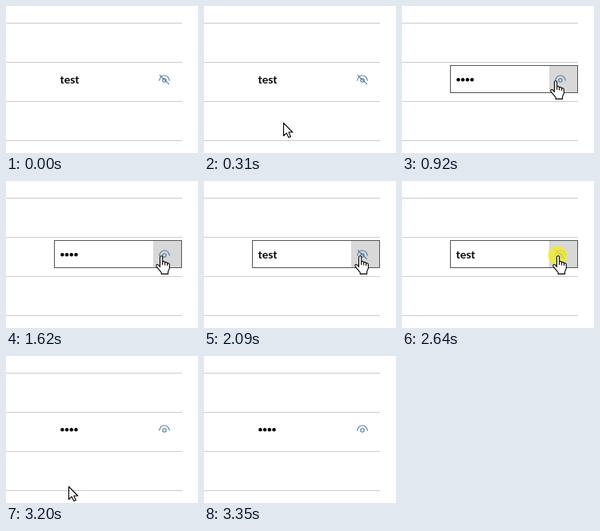
Animation, 240 px wide and 184 px high, one loop 4.52 s. Source, as an HTML page:

```html
<!DOCTYPE html>
<html lang="en">
<head>
<meta charset="utf-8">
<title>Password field</title>
<style>
html, body { margin: 0; width: 100%; height: 100%; overflow: hidden; background: #fff; }
svg { display: block; width: 240px; height: 184px; }
text { font: 700 14px Lato, sans-serif; }
.eye { fill: none; stroke: #4c7799; stroke-width: 1.1; stroke-linecap: round; }
.cursor { fill: #fff; stroke: #000; stroke-width: 1.1; stroke-linejoin: round; }
</style>
</head>
<body>
<svg viewBox="0 0 240 184">
  <path d="M0 21.5H220M0 70.5H220M0 119.5H220M0 168.5H220" stroke="#cbcbcb"/>
  <g id="field">
    <rect x="60" y="74" width="160" height="35" fill="#fff"/>
    <rect x="184" y="75" width="35" height="33" fill="#d8d8d8"/>
    <rect x="60.5" y="74.5" width="159" height="34" fill="none" stroke="#555"/>
  </g>
  <text id="word" x="67.5" y="97">test</text>
  <g id="dots">
    <circle cx="70.4" cy="92.3" r="2.2"/><circle cx="76.1" cy="92.3" r="2.2"/>
    <circle cx="81.8" cy="92.3" r="2.2"/><circle cx="87.5" cy="92.3" r="2.2"/>
  </g>
  <g class="eye">
    <path d="M191.6 93.2C193.5 84.9 202.5 84.9 204.4 93.2"/>
    <circle cx="198" cy="93" r="2.2"/>
    <path id="slash" d="M192.3 86.7L203.5 97.7"/>
  </g>
  <circle id="click" cx="194.5" cy="93" r="12" fill="#f4ee20" opacity=".75"/>
  <path id="arrow" class="cursor" d="M.5 .5V16.5L4.2 13L6.8 18.6L9.4 17.5L6.9 12H11.8Z"/>
  <g id="hand" class="cursor">
    <path d="M5.5 14.5V2.3C5.5 .2 8.7 .2 8.7 2.3V8.2C9.2 7.2 11.6 7.4 11.7 9C12.4 8.2 14.4 8.4 14.6 10C15.6 9.4 17.4 10 17.4 11.8V15.5C17.4 18 15.6 19 15.6 21V23.4H7.2V21.5C6 19.5 2.5 16.5 1 13.8C.2 12 2.2 10.8 3.6 12.2L5.5 14.5Z"/>
    <path d="M8.7 8.2V12M11.7 9V12.4M14.6 10V13" fill="none"/>
  </g>
</svg>
<script>
const LOOP = 4520;
const $ = id => document.getElementById(id);
const show = (id, on) => $(id).setAttribute('visibility', on ? 'visible' : 'hidden');
const within = (t, a, b) => t >= a && t < b;

// Point on a quadratic curve
const curve = (p, a, b, c) => [0, 1].map(i =>
  (1 - p) ** 2 * a[i] + 2 * p * (1 - p) * b[i] + p * p * c[i]);

// The pointer is sampled in steps of about 78 ms
const stepAt = (t, start) => Math.floor((t - start + 2) / 78);

function pointer(t) {
  if (t < 150 || t >= 3350) return null;
  if (t < 540) return curve(Math.min(stepAt(t, 150), 4) / 5, [2, 163], [140, 150], [192, 93]);
  if (t < 1620) return [192, 93];
  if (t < 1700) return [194, 93];
  if (t < 2960) return [195, 93];
  return curve(Math.min(stepAt(t, 2960), 4) / 4, [195, 120], [170, 165], [3, 166]);
}

function draw(t) {
  const pos = pointer(t);
  const hover = pos && within(pos[0], 60, 220) && within(pos[1], 74, 110);
  const onEye = hover && pos[0] >= 184;
  const masked = within(t, 920, 2090) || t >= 2730;

  show('field', hover);
  show('word', !masked);
  show('dots', masked);
  show('slash', !masked);
  show('click', within(t, 2020, 2090) || within(t, 2640, 2730));
  show('arrow', pos && !onEye);
  show('hand', onEye);
  if (!pos) return;
  const [x, y] = pos.map(Math.round);
  $('arrow').setAttribute('transform', `translate(${x} ${y})`);
  $('hand').setAttribute('transform', `translate(${x - 7} ${y})`);
}

const start = performance.now();
function tick() {
  draw((performance.now() - start) % LOOP);
  requestAnimationFrame(tick);
}
tick();
</script>
</body>
</html>
```
